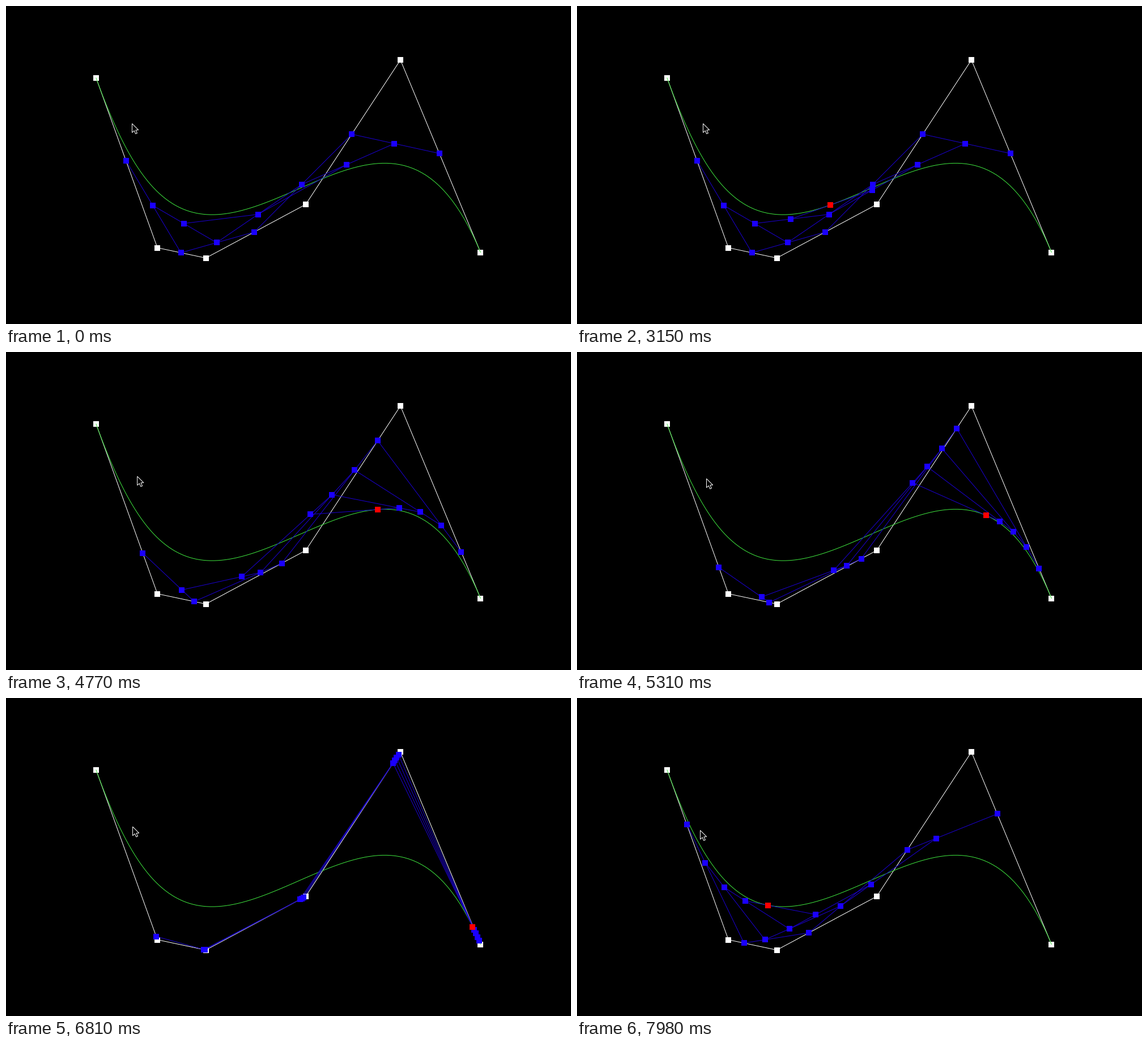
These frames come from a looping animation (997x561 px, 8000 ms). A matplotlib script:

```python
import numpy as np
import matplotlib.pyplot as plt
from matplotlib.animation import FuncAnimation
from matplotlib.patches import Polygon

W, H, DPI = 997, 561, 64
LOOP, STEP = 8000, 20
PX = 72 / DPI  # points per pixel

WHITE, GREEN, RED = "#ffffff", "#3fe53f", "#ff0000"
BLUE, BLUE_LINE = "#1a00ff", "#1b00d2"

CTRL = np.array([(159, 127), (267.2, 426.5), (352.6, 444.6),
                 (528.9, 350), (696, 95.2), (837.4, 434.6)])

# when each part of the construction shows up, in ms
DOTS_AT, LINE_AT, POINT_AT = 780, 1350, 1830


def smooth(u):
    return u * u * (3 - 2 * u)


def speed_up(u):
    return u ** 3


def slow_down(u):
    return 1.34 * u - 0.34 * u * u


# start, end, curve parameter at the end, cursor tip at the end, easing
REST = (0.486, 222.5, 207.5)
MOVES = [
    (3400, 4160, 0.616, 237, 212.5, smooth),
    (4420, 5000, 0.845, 228.5, 223.5, smooth),
    (5300, 5900, 1.0, 224, 226.5, smooth),
    (6160, 6200, 1.0, 223.5, 226.5, smooth),
    (6420, 7260, 0.789, 224, 232.5, speed_up),
    (7260, 7980, 0.322, 217.5, 233.5, slow_down),
]

ARROW = np.array([(0, 0), (0, 15.8), (3.7, 12.4), (6.2, 18), (8.9, 16.8),
                  (6.4, 11.4), (11.2, 11.2)])


def state(ms):
    now = np.array(REST)
    for start, end, *goal, ease in MOVES:
        if ms < start:
            break
        u = min((ms - start) / (end - start), 1)
        now = now + (np.array(goal) - now) * ease(u)
    return now


def casteljau(t):
    """All levels of the construction, from five points down to one."""
    levels, pts = [], CTRL
    while len(pts) > 1:
        pts = (1 - t) * pts[:-1] + t * pts[1:]
        levels.append(pts)
    return levels


fig = plt.figure(figsize=(W / DPI, H / DPI), dpi=DPI, facecolor="black")
ax = fig.add_axes([0, 0, 1, 1])
ax.set_xlim(0, W)
ax.set_ylim(H, 0)
ax.axis("off")


def stroke(color, z, pts=((), ())):
    return ax.plot(*pts, color=color, lw=PX, zorder=z, snap=False)[0]


def squares(color, z, pts=((), ())):
    return ax.plot(*pts, "s", color=color, ms=10.9 * PX, mew=0, zorder=z,
                   snap=False)[0]


stroke(WHITE, 1, CTRL.T)
squares(WHITE, 2, CTRL.T)
curve = np.array([casteljau(t)[-1][0] for t in np.linspace(0, 1, 101)])
stroke(GREEN, 3, curve.T)

lines = [stroke(BLUE_LINE, 4) for _ in range(4)]
dots = [squares(BLUE, 5) for _ in range(4)]
point = squares(RED, 6)
cursor = ax.add_patch(Polygon(ARROW, fc="black", ec=WHITE, lw=PX,
                              joinstyle="miter", zorder=7))


def draw(i):
    ms = i * STEP
    t, x, y = state(ms)
    levels = casteljau(t)
    for line, dot, pts in zip(lines, dots, levels):
        line.set_data(*pts.T)
        dot.set_data(*pts.T)
    point.set_data(*levels[-1].T)
    dots[3].set_visible(ms >= DOTS_AT)
    lines[3].set_visible(ms >= LINE_AT)
    point.set_visible(ms >= POINT_AT)
    cursor.set_xy(ARROW + (x, y))
    return [*lines, *dots, point, cursor]


anim = FuncAnimation(fig, draw, frames=LOOP // STEP, interval=STEP,
                     repeat=True, repeat_delay=0)
plt.show()
```
